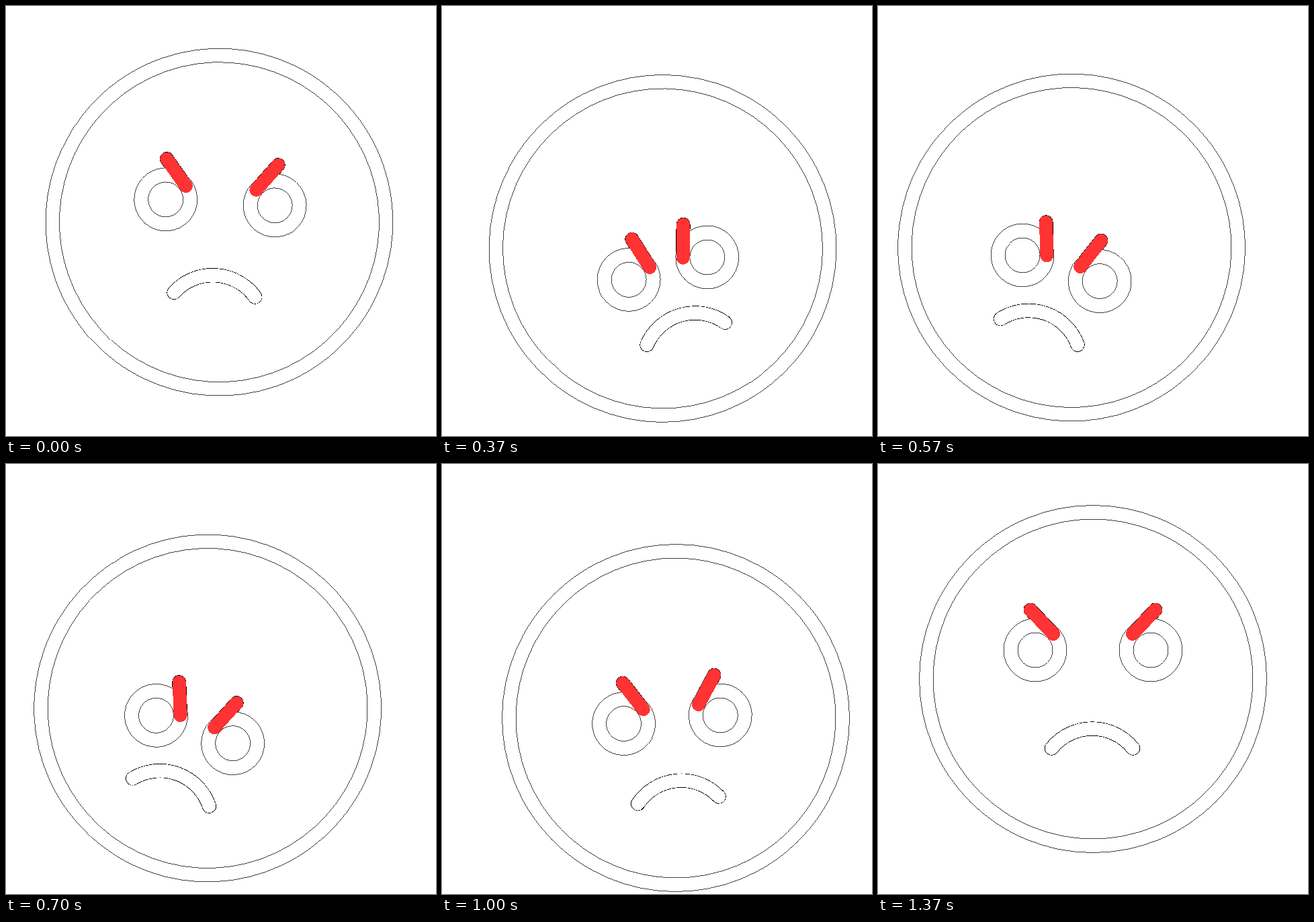
An HTML page that plays this animation: 640 px wide and 640 px high, repeating every 1670 ms.

```html
<!DOCTYPE html>
<html lang="en">
<head>
<meta charset="utf-8">
<title>Angry face</title>
<style>
  html, body { margin: 0; width: 100%; height: 100%; overflow: hidden; background: #fff; }
  svg { display: block; width: 100vw; height: 100vh; shape-rendering: crispEdges; }
  .line { fill: #fff; stroke: #000; stroke-width: .75; }
  .pen { fill: none; stroke-linecap: round; }
</style>
</head>
<body>
<svg viewBox="0 0 640 640">
  <defs>
    <path id="brow" class="pen" d="M-7-60 27-24"/>
    <path id="lip" class="pen" d="M-60.5 0A77.6 77.6 0 0 1 60.5 0"/>
    <g id="eye">
      <use href="#brow" stroke="#000" stroke-width="21"/>
      <circle class="line" r="47"/>
      <circle class="line" r="26"/>
      <use href="#brow" stroke="#f33" stroke-width="20"/>
    </g>
  </defs>
  <g id="head">
    <circle class="line" r="258.5"/>
    <circle class="line" r="238"/>
    <g id="mouth">
      <use href="#lip" stroke="#000" stroke-width="21.3"/>
      <use href="#lip" stroke="#fff" stroke-width="19.8"/>
    </g>
    <use id="left" href="#eye"/>
    <use id="right" href="#eye"/>
  </g>
</svg>
<script>
const LOOP = 1670, LAST = 41, START = -1.5;

// Turning points of the head: step, x, turn in degrees
const swing = [
  [START, 320, 0], [7, 285.5, 42], [13.8, 353, -49], [18, 278, 29],
  [25, 335, 5.7], [35, 361, -15.7], [LAST, 320, 0]
];

// Step, y
const drop = [[START, 320], [10, 361], [17, 359.5], [30, 378], [33.3, 378], [LAST, 320]];

// Face poses: step, eye x, eye y, mouth y, frown in degrees, sideways shift
const poses = [
  [START, 86, -43, 103, 0, 0],
  [11, 60.7, 30.8, 131.5, 27, -0.5],
  [25, 60.7, 38.5, 138, 18.9, -10.5],
  [LAST, 86, -43, 103, 0, 0]
];

const sway = u => (1 - Math.cos(Math.PI * u)) / 2;
const settle = u => 1 - (1 - u) ** 1.6;
const linear = u => u;

// Returns the values of a key row, eased between its neighbours.
function tween(keys, step, pickEase) {
  let i = 0;
  while (i < keys.length - 2 && step >= keys[i + 1][0]) i++;
  const [t0, ...a] = keys[i], [t1, ...b] = keys[i + 1];
  const e = pickEase(i)((step - t0) / (t1 - t0));
  return a.map((v, k) => v + (b[k] - v) * e);
}

const place = (id, value) => document.getElementById(id).setAttribute("transform", value);

function draw(ms) {
  const ticks = Math.floor(ms % LOOP / 10);
  const step = Math.min(LAST, Math.floor((ticks + 0.5) * 0.3));
  const [x, turn] = tween(swing, step, () => sway);
  const [y] = tween(drop, step, () => sway);
  const [eyeX, eyeY, mouthY, frown, shift] =
    tween(poses, step, i => i === 1 ? linear : settle);

  place("head", `translate(${x} ${y}) rotate(${turn})`);
  place("mouth", `translate(${shift - 1} ${mouthY})`);
  place("left", `translate(${shift - eyeX} ${eyeY}) rotate(${frown})`);
  place("right", `translate(${shift + eyeX} ${eyeY}) scale(-1 1) rotate(${frown})`);
}

const start = performance.now();
function tick() {
  draw(performance.now() - start);
  requestAnimationFrame(tick);
}
tick();
</script>
</body>
</html>
```
